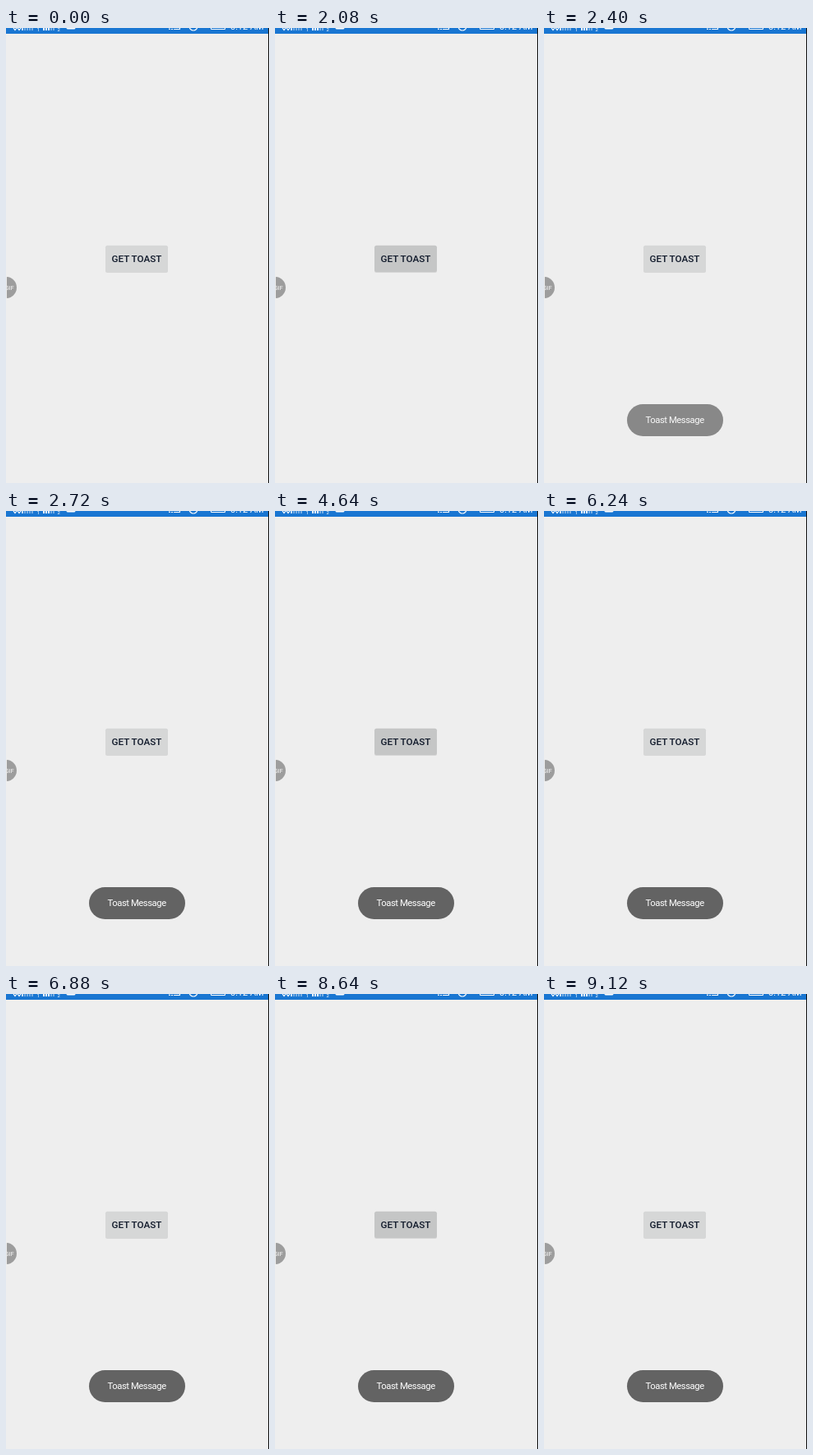
Animation, 320 px wide and 554 px high, one loop 9.28 s. Source, as an HTML page:

```html
<!DOCTYPE html>
<html lang="en">
<head>
<meta charset="utf-8">
<title>Toast demo</title>
<style>
  html, body { margin: 0; width: 100%; height: 100%; overflow: hidden; background: #eee; }
  svg { display: block; width: 100%; height: 100%; font-family: Roboto, sans-serif; }
  .icon { fill: none; stroke: #fff; }
</style>
</head>
<body>
<svg viewBox="0 0 320 554">
  <defs>
    <g id="toast">
      <rect x="101" y="458" width="117" height="39" rx="19.5" fill="#636363"/>
      <text x="123.5" y="481" font-size="11.3" letter-spacing="-.45" fill="#fff">Toast Message</text>
    </g>
    <clipPath id="edge"><rect x="1" y="300" width="20" height="32"/></clipPath>
  </defs>

  <rect width="320" height="554" fill="#eee"/>
  <rect width="320" height="7" fill="#1976d2"/>
  <g id="bars"></g>
  <g font-size="6" fill="#fff">
    <text x="37.5" y="4">1</text>
    <text x="62.5" y="4">2</text>
  </g>
  <path class="icon" d="M9 0l2 2.5 2-2.5M14 0l2 2.5 2-2.5" stroke-width="1.2"/>
  <path d="M73.5 0h11q0 1.5-2 1.5h-7q-2 0-2-1.5z" fill="#fff"/>
  <path class="icon" d="M204 1.5h7.5V0M198 1.5h2M201 1.5h2M198 0h1.5" stroke-width="1.1"/>
  <circle class="icon" cx="228" cy="-2" r="5" stroke-width="1.2"/>
  <path class="icon" d="M249.5 0v1.5h17V0" stroke-width="1"/>
  <text x="273" y="2" font-size="11" fill="#fff">8:12 AM</text>

  <rect x="121" y="265.5" width="76" height="32.5" rx="2.5" fill="#000" opacity=".1"/>
  <rect x="121" y="264.7" width="76" height="32.3" rx="2.5" fill="#d6d7d7"/>
  <rect id="press" x="121" y="264.7" width="76" height="32.3" rx="2.5" fill="#000"/>
  <text x="159" y="285.4" font-size="11.7" font-weight="500" text-anchor="middle" fill="#10192a">GET TOAST</text>

  <g clip-path="url(#edge)">
    <circle cx="0" cy="316" r="13" fill="#9d9d9d"/>
    <text x="-1" y="318.5" font-size="7" fill="#fff">GIF</text>
  </g>

  <use id="first" href="#toast"/>
  <use id="second" href="#toast"/>
  <rect x="319" width="1" height="554" fill="#111"/>
</svg>
<script>
  const LOOP = 9280, STEP = 160;
  const taps = [[1920, 2240], [4640, 4800], [6560, 6720], [8640, 8960]];
  const $ = id => document.getElementById(id);
  const ramp = (t, start, length) => Math.min(1, Math.max(0, (t - start) / length));
  const easeOut = x => 1 - (1 - x) ** 2;

  // Signal strength bars; the first set is dim.
  const bar = (x, i, alpha) =>
    `<rect x="${x + i * 3}" width="2" height="3" fill="#fff" opacity="${alpha}"/>`;
  $("bars").innerHTML = [0, 1, 2, 3, 4].map(i =>
    bar(19, i, i ? .4 : .75) + bar(45, i, i < 3 ? 1 : .4)).join("");

  function pressAt(t) {
    for (const [down, up] of taps) {
      if (t >= down && t < up) return 1;
      if (t >= up && t < up + STEP) return .5;
    }
    return 0;
  }

  function draw(t) {
    $("press").setAttribute("opacity", .08 * pressAt(t));
    $("first").setAttribute("opacity",
      easeOut(ramp(t, 2160, 500)) * (1 - ramp(t, 5600, 480)));
    $("second").setAttribute("opacity", easeOut(ramp(t, 5740, 500)));
  }

  const begin = performance.now();
  function tick() {
    const t = (performance.now() - begin) % LOOP;
    draw(Math.floor(t / STEP) * STEP);
    requestAnimationFrame(tick);
  }
  tick();
</script>
</body>
</html>
```
